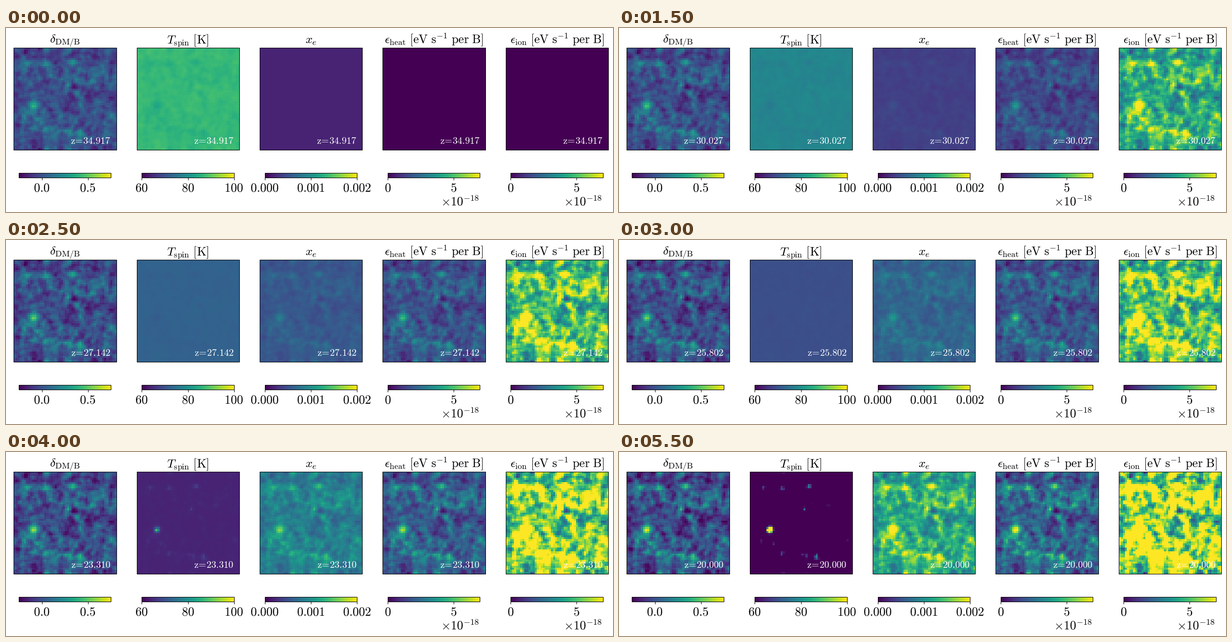
Animation, 1280 px wide and 391 px high, one loop 7 s. Source, as a matplotlib script:

```python
import numpy as np
import matplotlib.pyplot as plt
from matplotlib.animation import FuncAnimation
from matplotlib.patches import Rectangle

W, H, DPI = 1280, 391, 64      # DPI divides both sides exactly
PT = 72 / DPI                  # points per pixel
N = 50                         # cells along one side of the box
SIDE, PITCH, BAR = 216.3, 259.4, 194.4
LAST, HOLD = 11, 2             # last redshift step, extra beats on it

plt.rcParams["mathtext.fontset"] = "cm"

# Most visible halos and voids: x, y, radius, amplitude
CLUMPS = [
    (9, 28, 1.9, .62), (9, 22, 2, .2), (28.5, 7, 1.5, .38),
    (30.3, 21.5, 1.2, .35), (32, 27, 1.6, .2), (43, 11, 2.2, .2),
    (46, 1, 1.5, .28), (20, 45, 4, .1), (35, 38, 3, -.12),
]


def linear_field():
    """Random field with a falling spectrum, plus the main clumps."""
    rng = np.random.default_rng(21)
    freq = np.fft.fftfreq(N)
    f = np.hypot(freq[:, None], freq)
    spectrum = np.exp(-(f / .4) ** 2) / (f + .06)
    spectrum[0, 0] = 0
    noise = np.fft.ifft2(np.fft.fft2(rng.normal(size=(N, N))) * spectrum).real
    noise *= .12 / noise.std()

    y, x = np.mgrid[:N, :N]
    lumps = sum(a * np.exp(-((x - cx) ** 2 + (y - cy) ** 2) / (2 * r * r))
                for cx, cy, r, a in CLUMPS)
    calm = 1 - .6 * np.clip(lumps / .4, 0, 1)
    return noise * calm + lumps - lumps.mean()


FIELD = linear_field()


def redshift(k):
    return 21 * 1.05 ** (LAST - k) - 1


def spin_temperature(k, delta):
    """Adiabatic cooling, then X-ray heating around the densest halo."""
    cooling = (86.7 - 2.83 * k) * (1 - .1 * (1 - k / 7) * delta)
    heating = 6 * max(k - 6, 0) ** 2
    return cooling + heating * (np.clip(delta, 0, None) / delta.max()) ** 4


def panels(k):
    """The five maps, scaled so that 0..1 spans each colour bar."""
    t = k / LAST
    growth = (21 / (1 + redshift(k))) ** .9
    delta = np.exp(FIELD * growth) - 1
    return [
        delta + .25,
        (spin_temperature(k, delta) - 60) / 40,
        .1 + .52 * t ** 1.35 + 1.1 * t ** 1.7 * delta,
        t ** .3 * (.33 + 1.05 * delta),
        t ** .27 * (.89 + 2.4 * delta),
    ]


fig = plt.figure(figsize=(W / DPI, H / DPI), dpi=DPI, facecolor="white")
ax = fig.add_axes([0, 0, 1, 1])
ax.axis("off")


def text(x, y, s, size=26, ha="center", **kw):
    return ax.text(x, y, f"${s}$", fontsize=size * PT, ha=ha, va="baseline", **kw)


def picture(data, x, y, w, h):
    ax.add_patch(Rectangle((x, y), w, h, fill=False, ec="black",
                           lw=1.1 * PT, joinstyle="miter", zorder=3))
    return ax.imshow(data, extent=(x, x + w, y + h, y), cmap="viridis", vmin=0,
                     vmax=1, interpolation="nearest", aspect="auto")


def rm(s):
    return r"\mathrm{%s}" % s


RATE = r"\ " + rm(r"[eV\ s^{-1}\ per\ B]")
RATE_TICKS = [(0, "0"), (5 / 7, "5")]
LAYOUT = [
    (r"\delta_" + rm("DM/B"), [(.25, "0.0"), (.75, "0.5")]),
    ("T_" + rm("spin") + r"\ " + rm("[K]"), [(0, "60"), (.5, "80"), (1, "100")]),
    ("x_e", [(0, "0.000"), (.5, "0.001"), (1, "0.002")]),
    (r"\epsilon_" + rm("heat") + RATE, RATE_TICKS),
    (r"\epsilon_" + rm("ion") + RATE, RATE_TICKS),
]

maps, labels = [], []
for i, (title, ticks) in enumerate(LAYOUT):
    x = 16.3 + PITCH * i
    bar = x + 10.6
    text(x + SIDE / 2, 33, title, 25.6)
    maps.append(picture(np.zeros((N, N)), x, 42, SIDE, 217))
    labels.append(text(x + 205, 246, "", 20.5, "right", color="white", zorder=4))
    picture(np.linspace(0, 1, 256)[None], bar, 308, BAR, 10)
    for frac, name in ticks:
        tx = bar + frac * BAR
        ax.plot([tx, tx], [318, 323], color="black", lw=1.1 * PT,
                solid_capstyle="butt")
        text(tx - .5, 347, rm(name))
    if ticks is RATE_TICKS:
        text(bar + BAR - 2, 377, r"{\times}" + rm("10^{-18}"), ha="right")

ax.set_xlim(0, W)
ax.set_ylim(H, 0)


def update(frame):
    k = min(frame, LAST)
    z = redshift(k) + 1e-9     # rounds halves up
    stamp = "$" + rm(rf"z\!=\!{z:.3f}") + "$"
    for im, label, data in zip(maps, labels, panels(k)):
        im.set_data(data)
        label.set_text(stamp)
    return maps + labels


anim = FuncAnimation(fig, update, frames=LAST + 1 + HOLD, interval=500,
                     repeat=True, repeat_delay=0)
plt.show()
```
